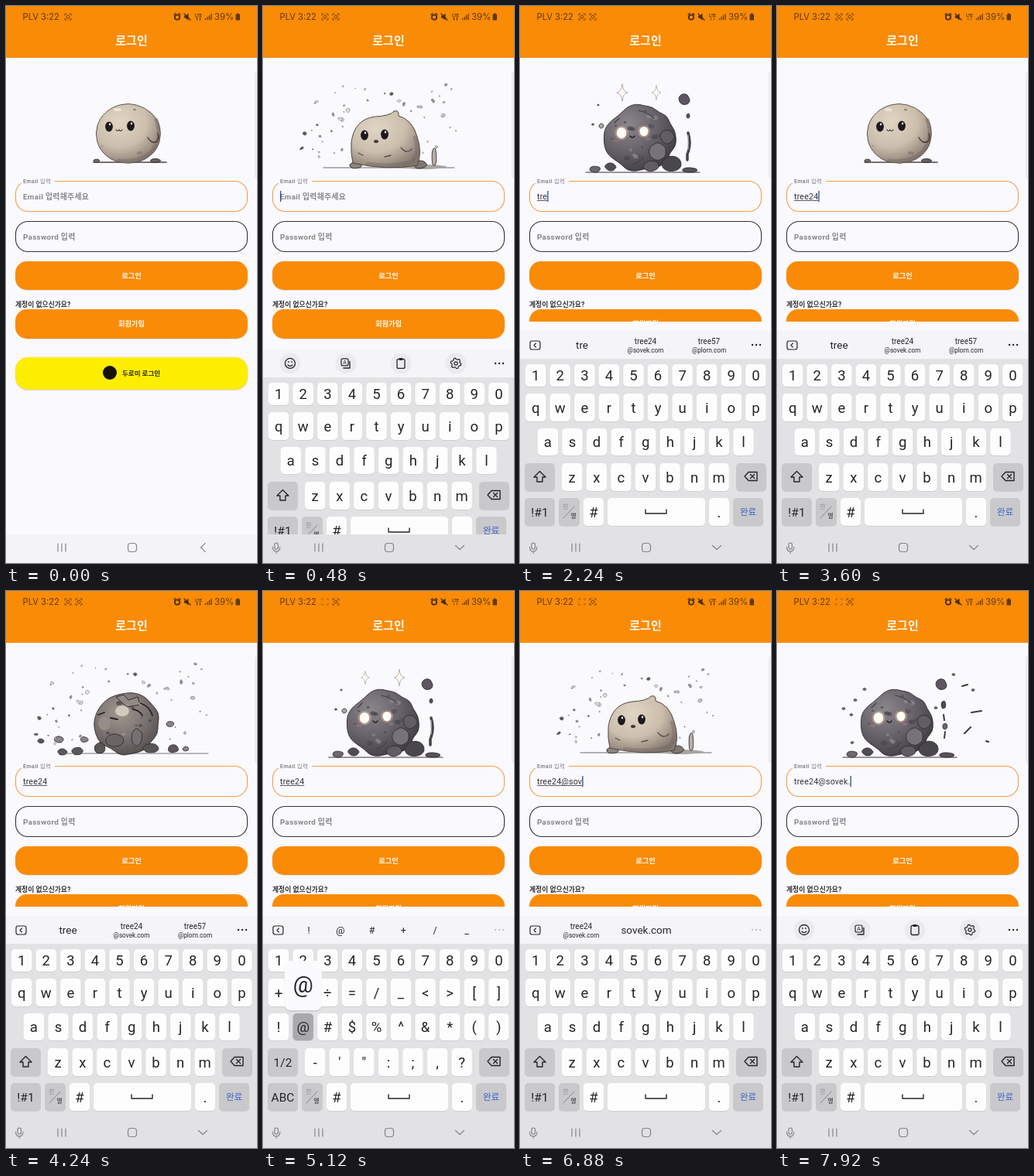
An HTML page for the animation above (8 s loop, 324 by 720 pixels).

```html
<!DOCTYPE html>
<html lang="ko">
<head>
<meta charset="utf-8">
<title>로그인</title>
<style>
html, body { margin: 0; width: 100%; height: 100%; overflow: hidden; background: #faf9fe; }
svg { display: block; width: 100%; height: 100%; }
text { font-family: Roboto, "Noto Sans CJK KR", "Noto Sans CJK", sans-serif; white-space: pre; }
.status { font-family: Inter, sans-serif; }
</style>
</head>
<body>
<svg id="stage" viewBox="0 0 324 720" xmlns="http://www.w3.org/2000/svg"></svg>
<script>
const LOOP = 8000, ORANGE = '#fa8b07', PAGE = '#faf9fe', INK = '#252528';
const stage = document.getElementById('stage');
const $ = id => document.getElementById(id);

// Markup helpers
const esc = s => s.replace(/&/g, '&amp;').replace(/</g, '&lt;');
const rect = (x, y, w, h, r, fill, more = '') =>
  `<rect x="${x}" y="${y}" width="${w}" height="${h}" rx="${r}" fill="${fill}" ${more}/>`;
const oval = (x, y, rx, ry, fill, more = '') =>
  `<ellipse cx="${x}" cy="${y}" rx="${rx}" ry="${ry}" fill="${fill}" ${more}/>`;
const line = (d, color, w = 1, more = '') =>
  `<path d="${d}" fill="none" stroke="${color}" stroke-width="${w}" stroke-linecap="round" stroke-linejoin="round" ${more}/>`;
const text = (x, cy, size, s, fill = INK, more = 'text-anchor="middle"') =>
  `<text x="${x}" y="${(cy + size * .36).toFixed(1)}" font-size="${size}" fill="${fill}" ${more}>${esc(s)}</text>`;
const group = (id, body, more = '') => `<g id="${id}" ${more}>${body}</g>`;
const MID = 'text-anchor="middle" font-weight="700"';

function random(seed) {
  return () => (seed = (seed * 16807) % 2147483647) / 2147483647;
}

// Closed smooth outline with uneven radius
function blob(cx, cy, rx, ry, n, rough, seed) {
  const rnd = random(seed * 7919), p = [];
  for (let i = 0; i < n; i++) {
    const a = i / n * Math.PI * 2, k = 1 + (rnd() - .5) * rough;
    p.push([cx + Math.cos(a) * rx * k, cy + Math.sin(a) * ry * k]);
  }
  const half = i => {
    const a = p[i % n], b = p[(i + 1) % n];
    return `${((a[0] + b[0]) / 2).toFixed(1)} ${((a[1] + b[1]) / 2).toFixed(1)}`;
  };
  let d = 'M' + half(n - 1);
  p.forEach((q, i) => d += `Q${q[0].toFixed(1)} ${q[1].toFixed(1)} ${half(i)}`);
  return d + 'Z';
}
const stone = (x, y, rx, ry, fill, seed, edge = '#302c31', rough = .2, n = 12) =>
  `<path d="${blob(x, y, rx, ry, n, rough, seed)}" fill="${fill}" stroke="${edge}" stroke-width=".9"/>`;

// Small shaded marks spread over a body
function speckle(cx, cy, rx, ry, count, tints, seed) {
  const rnd = random(seed);
  return Array.from({ length: count }, () => {
    const a = rnd() * Math.PI * 2, k = .3 + rnd() * .6, s = 1 + rnd() * 3;
    return oval((cx + Math.cos(a) * rx * k).toFixed(1), (cy + Math.sin(a) * ry * k).toFixed(1), s, s * .75,
      tints[rnd() * tints.length | 0], 'opacity=".75"');
  }).join('');
}

// Characters
const paleEye = (x, y) => oval(x, y, 4.9, 6.5, '#1d191c') + oval(x + 1, y - 3, 1.2, 1.4, '#fff');
function paleStone() {
  return line('M113 202H207', '#4c4443', 1.5) +
    stone(117, 200, 4, 2, '#776e69', 5) + stone(193, 200, 7, 2.5, '#65605f', 8) +
    stone(158, 165, 43, 40, 'url(#pale)', 21, '#51473f', .04) +
    line('M194 147q9 24-7 42q-16 14-42 11', '#70655f', 5, 'opacity=".45"') +
    oval(144, 134, 5, 2, '#eee5d4') + oval(166, 134, 2, 1.2, '#8d8277') +
    oval(124, 181, 2, 1, '#a99d8d') + oval(173, 190, 4, 2, '#8c817a') +
    paleEye(133, 156) + paleEye(161, 155) +
    line('M142 160q2 3 4 0q2 3 4 0', '#332b2c', 1.2) +
    line('M183 170q5 9 12 5q3-4 1-10', '#463c3b', 1.5);
}
function sunkStone() {
  return line('M78 209H247', '#6d6664', 1) + oval(207, 208, 30, 3, '#aaa4a0') +
    stone(120, 206, 8, 4, '#8d847d', 5) + stone(203, 205, 9, 5, '#807771', 8) + stone(221, 195, 3, 12, '#b8b0a8', 4) +
    `<path d="M116 203Q113 190 114 176Q118 146 145 143Q164 142 169 136Q176 134 175 142Q193 147 199 169Q206 190 199 206Q160 213 116 203Z" fill="url(#pale)" stroke="#51473f"/>` +
    line('M196 170q7 18-3 31q-28 8-58 3', '#70655f', 5, 'opacity=".4"') +
    paleEye(131, 167) + paleEye(157, 166) + oval(146, 175, 3, 2, '#463a38') +
    line('M178 183q7 9 14 2M123 190l6 3M157 195l8-2', '#5c504b', 1.3);
}
function curledStone() {
  return line('M76 210H261', '#56504f', .8) +
    stone(156, 172, 43, 39, 'url(#mix)', 33, '#332d2e', .15, 18) +
    `<path d="M142 137l10-3 6 7 12-4 3 10-17 3z" fill="#928a83" stroke="#332d2e"/>` +
    speckle(156, 174, 40, 36, 16, ['#4a4548', '#9a918a', '#5d5758'], 55) +
    oval(150, 155, 9, 7, '#d1c9bc') + oval(127, 171, 8, 9, '#968d86') +
    line('M119 160l8-3M135 164l9 2M164 153q8 1 12 8M174 145q12 5 15 16', '#282326', 1.8) +
    stone(169, 189, 7, 11, '#777073', 19) + stone(140, 193, 12, 9, '#6b6465', 41) +
    stone(121, 203, 7, 7, '#5a5557', 6) + stone(187, 203, 10, 6, '#5a5557', 9) +
    [[45, 194, 4], [68, 192, 6], [73, 208, 6], [101, 192, 5], [92, 207, 7], [212, 172, 5], [216, 204, 7], [232, 204, 4]]
      .map((s, i) => stone(s[0], s[1], s[2], s[2] * .7, i % 2 ? '#8b858a' : '#5c575d', i + 60)).join('');
}
function darkStone() {
  const eye = (x, y, r) => oval(x, y, r + 2.5, r + 3, '#f3c9a0', 'opacity=".35"') + oval(x, y, r, r + .7, '#fffdf4');
  return line('M85 215H232', '#39353c', 1.2) +
    stone(155, 171, 45, 42.5, 'url(#dark)', 77, '#302c33', .13, 26) +
    speckle(154, 168, 42, 38, 22, ['#4a464e', '#8d888d', '#55505a'], 91) +
    line('M153 135q13 3 20 10M122 151l6-6M146 204q9-2 13-8', '#433f47', 1.2) +
    stone(190, 169, 9, 9, '#625d65', 16) + stone(178, 188, 11, 11, '#77717a', 18) +
    stone(195, 204, 13, 10, '#4a464e', 26) + stone(169, 207, 10, 7, '#615c64', 27) +
    stone(117, 208, 7, 5, '#504b54', 31) + stone(97, 211, 7, 4, '#6d6870', 34) + stone(219, 212, 10, 3, '#57525a', 37) +
    eye(131, 164, 6.3) + eye(160, 162, 5.5) + line('M142 168q3 4 6 0', '#211e25', 1.4) +
    oval(124, 174, 3, 1.5, '#94757a') + oval(165, 172, 3, 1.5, '#94757a') +
    stone(212, 121, 7, 7, '#5b565f', 43);
}
const star = (x, y) => `<path class="star" data-x="${x}" data-y="${y}" d="M0-11Q1-1 7 0Q1 1 0 11Q-1 1-7 0Q-1-1 0-11Z" fill="#fffaf1" stroke="#a19a99" stroke-width=".8"/>`;
const glow = () => star(132, 112) + star(176, 112) +
  line('M217 164q4 13 0 25M216 191v8', '#44404a', 3.5) + line('M217 167v18', '#b9b3bd', 1.2) +
  stone(217, 142, 2, 3, '#55515a', 3) + stone(105, 155, 3, 3, '#aaa6ab', 7) +
  stone(94, 153, 1.5, 1, '#77727a', 9) + stone(101, 128, 1, 1, '#77727a', 4);
const chunks = () => stone(215, 147, 3, 5, '#53473f', 4) + stone(217, 175, 3, 4, '#6d6666', 5) +
  line('M215 160l1 7M217 182l-1 8M239 123l7-2M242 184l8-8M251 157l13-2M270 194l3 1', '#3d383e', 2) +
  [[86, 152], [96, 160], [101, 141], [113, 127], [228, 108], [205, 151], [253, 128], [97, 196]]
    .map((p, i) => stone(p[0], p[1], 2, 1.4, '#807980', i + 4)).join('');

function makeDebris() {
  const rnd = random(4711), list = [];
  while (list.length < 46) {
    const x = 35 + rnd() * 225, y = 94 + rnd() * 104, size = .8 + rnd() * rnd() * 4.5;
    if (((x - 156) / 54) ** 2 + ((y - 172) / 52) ** 2 < 1 || (y < 125 && Math.abs(x - 158) > 100)) continue;
    list.push({ x, y, size, tint: ['#e6e1dd', '#c9c4c1', '#98939a', '#5b565c'][rnd() * 4 | 0] });
  }
  return list;
}
const debris = makeDebris();

// Keyboard
const keyIndex = {};
function key(layer, name, x, y, w, h, opt = {}) {
  const id = 'k' + Object.keys(keyIndex).length;
  keyIndex[layer + name] = { id, x: x + w / 2, y, fill: opt.fill || '#fdfdfe', name };
  return rect(x, y + 1, w, h, 5, '#cfcfd2') + rect(x, y, w, h, 5, opt.fill || '#fdfdfe', `id="${id}"`) +
    (opt.blank ? '' : text(x + w / 2, y + h / 2, opt.size || 18.5, name, opt.color));
}
const keyRow = (layer, names, cx, y, h) =>
  [...names].map((n, i) => key(layer, n, cx - 13 + i * 31.57, y, 26.4, h)).join('');
const SPECIAL = '#c9c9cb';
const wide = (layer, name, x, y, opt = {}) => key(layer, name, x, y, 39, 36, { fill: SPECIAL, size: 15.5, ...opt });

const lettersLayer = () => keyRow('a', 'qwertyuiop', 20, 501, 36) + keyRow('a', 'asdfghjkl', 35.7, 546, 35) +
  wide('a', 'shift', 6, 591, { blank: 1 }) + keyRow('a', 'zxcvbnm', 67, 591, 36) +
  line('M25.5 601.500l7.500 7.500h-4v6h-7v-6h-4z', INK, 1.4) + wide('a', '!#1', 6, 636);
const symbolsLayer = () => keyRow('s', '+×÷=/_<>[]', 20, 501, 36) + keyRow('s', '!@#$%^&*()', 20, 546, 35) +
  wide('s', '1/2', 6, 591) + keyRow('s', '-\'":;,?', 67, 591, 36) + wide('s', 'ABC', 6, 636);
const sharedKeys = () => keyRow('', '1234567890', 20, 463, 29) + wide('', 'back', 279, 591, { blank: 1 }) +
  line('M290 608l5-5.500h11v11h-11zM297.500 605.500l5 5M302.500 605.500l-5 5', INK, 1.4) +
  key('', 'lang', 50, 636, 27, 36, { fill: SPECIAL, blank: 1 }) + text(59, 647, 8, '한', '#909093') +
  line('M56 662l14-15', '#77777a', .8) + text(69, 659, 8, '영') +
  key('', '#', 82, 636, 26, 36) + key('', 'space', 113, 636, 126, 36, { blank: 1 }) +
  line('M162 651v5h27v-5', INK, 1.4) + key('', '.', 244, 636, 26, 36) +
  wide('', '완료', 275, 636, { size: 11.5, color: '#3f63c9' });

function gear(x, y) {
  let d = '';
  for (let i = 0; i < 24; i++) {
    const a = (i + .5) * Math.PI / 12, r = i % 4 < 2 ? 6.8 : 5.2;
    d += `${i ? 'L' : 'M'}${(x + r * Math.cos(a)).toFixed(1)} ${(y + r * Math.sin(a)).toFixed(1)}`;
  }
  return line(d + 'Z', INK, 1.2) + oval(x, y, 2.1, 2.1, 'none', `stroke="${INK}" stroke-width="1.2"`);
}
const dots = c => [300, 305, 310].map(x => oval(x, 438, 1.2, 1.2, c)).join('');
const backIcon = rect(13, 433, 13, 11, 2.5, 'none', `stroke="${INK}" stroke-width="1.2"`) + line('M20.500 436l-2.500 2.500 2.500 2.500', INK, 1.1);
const pair = (x, a, b) => text(x, 433, 10, a) + text(x, 445, 8.2, b);
function toolbarIcons() {
  return [35, 107, 178, 249].map(x => oval(x, 438, 13.5, 13.5, '#ebebed')).join('') +
    oval(35, 438, 6.5, 6.5, 'none', `stroke="${INK}" stroke-width="1.3"`) + oval(33, 436, .9, .9, INK) + oval(37, 436, .9, .9, INK) +
    line('M32 440q3 3 6 0', INK, 1.2) +
    rect(101, 432, 9, 9, 2, 'none', `stroke="${INK}" stroke-width="1.2"`) + line('M112 435.500v8.500h-8', INK, 1.4) + text(105.5, 436.5, 7, 'A') +
    rect(173, 432.5, 10, 12, 2, 'none', `stroke="${INK}" stroke-width="1.3"`) + rect(175.5, 431, 5, 3, 1, INK) +
    gear(249, 438) + dots(INK);
}

// Status bar and page
const scanIcon = (id, x) => group(id,
  line(`M${x - 4} 12v-2h2M${x + 2} 10h2v2M${x + 4} 16v2h-2M${x - 2} 18h-2v-2`, '#6d4209', 1) +
  `<g class="face">${oval(x, 14, 2, 2, 'none', 'stroke="#6d4209"')}</g>`);
const field = (y, h, color) => rect(12.5, y, 299, h, 16, 'none', `stroke="${color}" stroke-width="1.1"`);
const button = (y, h, label) => rect(12, y + 1, 300, h, 15, '#e4dfde') + rect(12, y, 300, h, 15, ORANGE) +
  text(162, y + h / 2, 9.3, label, '#fffaf2', MID);
const HINT = 'letter-spacing=".3" font-weight="700"';
const STATUS = 'class="status"';

const page = () => rect(0, 0, 324, 720, 0, PAGE) + rect(0, 0, 324, 67, 0, ORANGE) +
  text(21.5, 14, 11.2, 'PLV 3:22', '#5f3a0a', STATUS) + scanIcon('scanA', 80) + scanIcon('scanB', 94) +
  oval(221, 14.5, 3.2, 3.2, 'none', 'stroke="#4b2e08" stroke-width="1.8"') + line('M217 11l2-1.500M225 11l-2-1.500', '#4b2e08', 1.3) +
  `<path d="M230 12.500h2l3.500-3v9l-3.500-3h-2z" fill="#4b2e08"/>` + line('M230 10l8 8', '#4b2e08', 1.3) +
  text(248.5, 11.5, 5.5, 'LTE', '#5f3a0a', MID) + line('M246.500 15v3M250.500 18v-3', '#5f3a0a', 1.3, 'id="net"') +
  line('M257.500 16.500v1M260 14.500v3M262.500 12.500v5M265 10.500v7', '#5f3a0a', 1.3) +
  text(269, 14, 11.4, '39%', '#5f3a0a', STATUS) + rect(296.5, 10.5, 5.5, 8, 1, '#5f3a0a') + rect(298, 9.5, 2.5, 2, 0, '#5f3a0a') +
  text(162, 44.7, 15, '로그인', '#fffaf0', MID) +
  rect(321.5, 85, 5, 137, 2, '#f1f0f4', 'stroke="#dddce1" stroke-width=".6"') +
  group('pose0', paleStone()) + group('pose1', sunkStone()) + group('pose2', curledStone()) + group('pose3', darkStone()) +
  group('chunks', chunks()) + group('glow', glow()) +
  group('debris', debris.map((d, i) => `<path d="${blob(0, 0, d.size, d.size * .75, 5, .9, i + 9)}" fill="${d.tint}" stroke="#69636a" stroke-width=".5"/>`).join('')) +
  field(226.5, 39, '#f2a04c') + rect(19, 224, 44, 5, 0, PAGE) + text(22, 226.5, 7.2, 'Email 입력', '#77747a', 'letter-spacing=".4" font-weight="500"') +
  text(22, 246, 9.9, 'Email 입력해주세요', '#88868c', HINT + ' id="hint"') +
  text(22, 246, 10.6, '', '#333338', 'letter-spacing=".2" id="typed"') +
  rect(22, 251, 0, .8, 0, '#333338', 'id="under"') + rect(22, 239, 1.4, 14, 0, '#36549c', 'id="caret"') +
  field(278.5, 39, '#333338') + text(22, 298, 9.9, 'Password 입력', '#88868c', HINT) +
  button(330, 37, '로그인') + text(12, 385.5, 8.8, '계정이 없으신가요?', '#333', 'font-weight="700"') +
  button(392, 38, '회원가입') + rect(12, 455, 300, 42, 16, '#d7d2df') + rect(12, 454, 300, 42, 16, '#fdee00', 'stroke="#e9dda0" stroke-width=".6"') +
  oval(134, 474, 9, 9, '#15120a') + text(150, 474.5, 8.5, '두로미 로그인', '#2f2a0c', 'font-weight="700"');

const NAV = '#858588';
const navBar = () => rect(0, 683, 324, 37, 0, '#f4f4f6', 'id="navBg"') +
  line('M67 695v10M72 695v10M77 695v10', NAV, 1.2) + rect(157.5, 694.5, 11, 11, 3.5, 'none', `stroke="${NAV}" stroke-width="1.2"`) +
  line('M257 694.500l-5.500 5.500 5.500 5.500', NAV, 1.2, 'id="navBack"') +
  group('navDown', line('M248.500 697.500l5.500 5 5.500-5', NAV, 1.2) + rect(15, 694, 4.5, 8, 2.2, 'none', `stroke="${NAV}" stroke-width="1.2"`) +
    line('M12.500 699q0 6 4.700 6t4.700-6M17.200 705v2.500', NAV, 1.1));

stage.innerHTML = `<defs>
  <radialGradient id="pale" cx=".36" cy=".3" r=".78"><stop offset="0" stop-color="#e0d5c3"/><stop offset=".55" stop-color="#cbbeac"/><stop offset="1" stop-color="#82766f"/></radialGradient>
  <radialGradient id="mix" cx=".4" cy=".32" r=".75"><stop offset="0" stop-color="#a0978f"/><stop offset=".55" stop-color="#7b7371"/><stop offset="1" stop-color="#504a4c"/></radialGradient>
  <radialGradient id="dark" cx=".33" cy=".3" r=".75"><stop offset="0" stop-color="#8b868c"/><stop offset=".5" stop-color="#6b656d"/><stop offset="1" stop-color="#423e47"/></radialGradient>
  </defs>` + page() +
  group('board', rect(0, 408, 324, 320, 0, PAGE) + rect(0, 420, 324, 36, 0, '#f5f5f7') + rect(0, 456, 324, 280, 0, '#e2e2e4') +
    sharedKeys() + group('letters', lettersLayer()) + group('symbols', symbolsLayer()) +
    group('icons', toolbarIcons()) +
    group('words', backIcon + text(80, 438, 13.5, '', INK, 'text-anchor="middle" id="word"') +
      pair(162, 'tree24', '@sovek.com') + pair(244, 'tree57', '@plorn.com') + dots(INK)) +
    group('domain', backIcon + pair(79, 'tree24', '@sovek.com') + text(163, 438, 13.5, 'sovek.com') + dots('#c5c5c8')) +
    group('marks', backIcon + [...'!@#+/_'].map((c, i) => text(59 + i * 40.8, 438, 12.5, c)).join('') + dots('#c5c5c8'))) +
  navBar() +
  group('popup', rect(-24, -67, 48, 65, 8, '#c3c3c6', 'opacity=".6"') + rect(-24, -68, 48, 64, 8, '#fbfbfd') +
    text(0, -37, 29, '', INK, 'text-anchor="middle" id="popText"'));

// Press time and key; layer prefix "a" letters, "s" symbols
const presses = [[1360, 'at'], [1720, 'ar'], [2080, 'ae'], [2480, 'ae'], [2920, '2'], [3300, '4'], [4560, 'a!#1'], [5040, 's@'],
  [5560, 'sABC'], [5920, 'as'], [6280, 'ao'], [6640, 'av'], [6980, 'ae'], [7320, 'ak'], [7680, '.']];
const HOLD = 120, OPEN = 320, SLIDE = 280;
const show = (id, on) => $(id).style.display = on ? '' : 'none';
const stars = document.querySelectorAll('.star');
let held = null;

function drawStone(t) {
  const p = t % 3200;
  const pose = p < 440 || p >= 2720 ? 0 : p < 760 ? 1 : p < 1200 ? 2 : 3;
  for (let i = 0; i < 4; i++) show('pose' + i, i === pose);
  show('chunks', pose === 3 && p < 1760);
  show('glow', pose === 3 && p >= 1760);
  const burst = pose === 1 || pose === 2;
  show('debris', burst);
  if (burst) {
    const k = .9 + .13 * (p - 440) / 760;
    [...$('debris').children].forEach((e, i) => {
      const d = debris[i];
      e.setAttribute('transform', `translate(${156 + (d.x - 156) * k} ${170 + (d.y - 170) * k}) rotate(${p * .06 + i * 40})`);
    });
  }
  stars.forEach((s, i) => s.setAttribute('transform',
    `translate(${s.dataset.x} ${s.dataset.y}) scale(${.9 + .12 * Math.sin(p / 110 + i * 2)})`));
}

function drawInput(t) {
  let typed = '', symbols = false, bar = 'icons', last = OPEN, down = null;
  for (const [at, id] of presses) {
    if (t >= at && t < at + HOLD) down = keyIndex[id];
    if (t < at + HOLD) break;
    const name = keyIndex[id].name;
    if (name.length > 1) {
      symbols = name === '!#1';
      bar = symbols ? 'marks' : 'icons';
      continue;
    }
    typed += name;
    last = at + HOLD;
    bar = symbols ? 'marks' : name === '.' ? 'icons' : typed.includes('@') ? 'domain' : 'words';
  }
  show('letters', !symbols);
  show('symbols', symbols);
  ['icons', 'words', 'domain', 'marks'].forEach(id => show(id, id === bar));
  $('word').textContent = typed.replace(/\d/g, '');
  $('typed').textContent = typed;
  const width = typed ? $('typed').getComputedTextLength() : 0;
  show('hint', !typed);
  $('under').setAttribute('width', typed.endsWith('.') ? 0 : width);
  $('caret').setAttribute('x', 22 + width);
  show('caret', t >= OPEN && Math.floor((t - last) / 500) % 2 === 0);

  if (held) $(held.id).setAttribute('fill', held.fill);
  held = down;
  if (down) $(down.id).setAttribute('fill', '#a9a9ac');
  const pop = down && down.name.length === 1 && down.name !== '.';
  show('popup', pop);
  if (pop) {
    $('popup').setAttribute('transform', `translate(${Math.max(27, Math.min(297, down.x))} ${down.y})`);
    $('popText').textContent = down.name;
  }
}

function render(t) {
  const k = Math.max(0, Math.min(1, (t - OPEN) / SLIDE)), open = t >= OPEN;
  show('board', open);
  $('board').setAttribute('transform', `translate(0 ${312 * (1 - k) ** 3})`);
  $('navBg').setAttribute('fill', open ? '#e2e2e4' : '#f4f4f6');
  show('navBack', !open);
  show('navDown', open);
  const dim = (t + 200) % 1000 < 360 && t > 500;
  document.querySelector('#scanA .face').style.display = dim ? 'none' : '';
  $('scanA').setAttribute('opacity', dim ? .55 : 1);
  show('scanB', t > 300);
  $('net').setAttribute('opacity', t % 1300 < 700 ? 1 : .55);
  drawStone(t);
  drawInput(t);
}

const start = performance.now();
function tick(now) {
  render(Math.max(0, now - start) % LOOP);
  requestAnimationFrame(tick);
}
tick(start);
</script>
</body>
</html>
```
